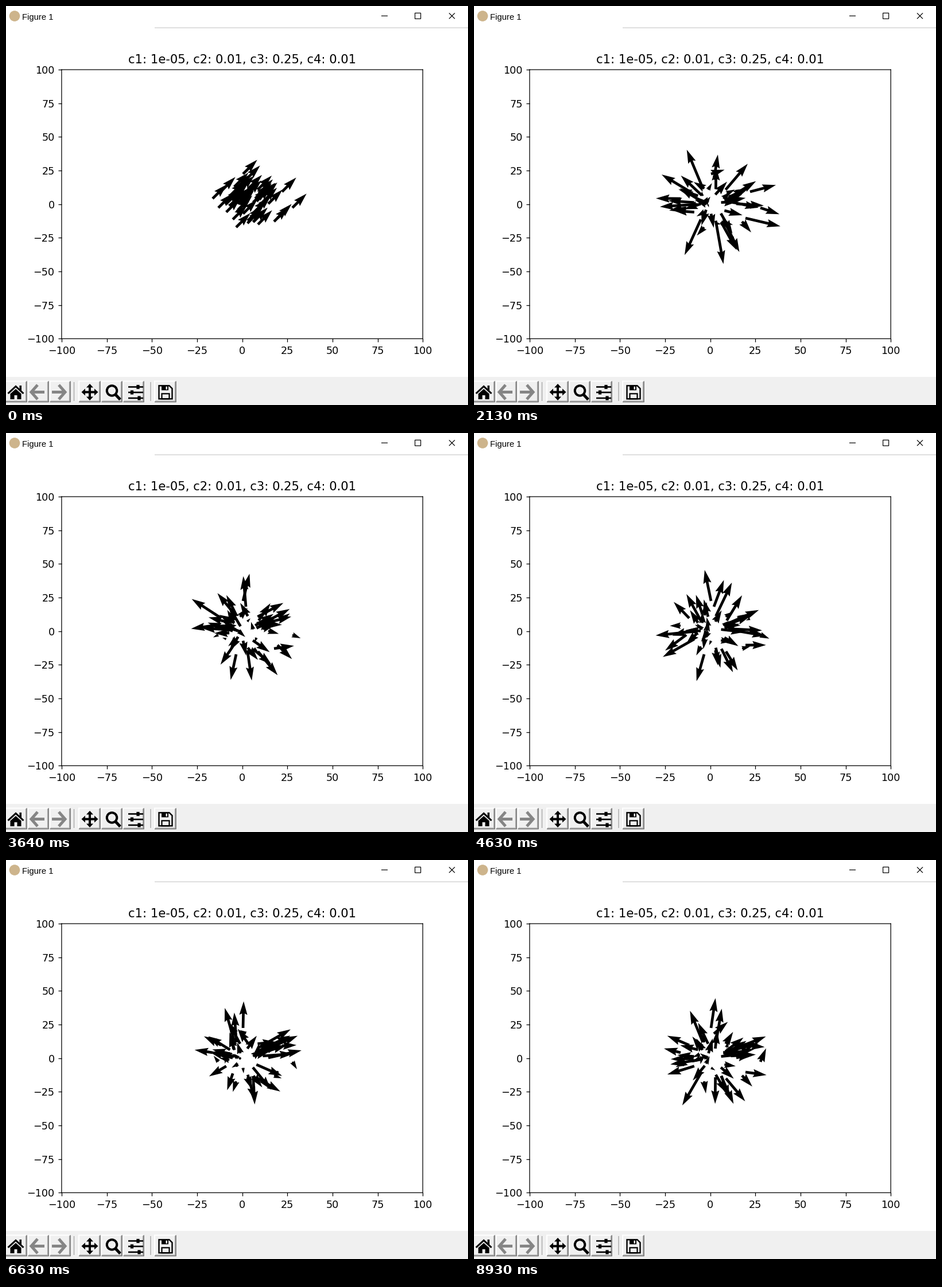
These frames come from a looping animation (805 px wide and 696 px high, 9.01 s). A matplotlib script:

```python
import numpy as np
import matplotlib.pyplot as plt
from matplotlib.animation import FuncAnimation
from matplotlib.patches import Circle, Polygon, Rectangle

W, H = 805, 696
PX = 0.72        # points per pixel at 100 dpi
ZOOM = 1.268     # the window is shown enlarged
FRAMES, STEP = 170, 53

plt.rcParams["font.family"] = "DejaVu Sans"
fig = plt.figure(figsize=(W / 100, H / 100), dpi=100, facecolor="white")

# Plot area
left, right, top, bottom = 96.9, 726.2, 111.1, 580.4
ax = fig.add_axes([left / W, 1 - bottom / H, (right - left) / W, (bottom - top) / H])
ax.set(xlim=(-100, 100), ylim=(-100, 100))
ticks = np.arange(-100, 101, 25)
ax.set_xticks(ticks)
ax.set_yticks(ticks)
ax.tick_params(labelsize=10 * ZOOM, length=3.5 * ZOOM, width=PX * ZOOM, pad=3.5 * ZOOM)
for spine in ax.spines.values():
    spine.set(linewidth=PX * ZOOM, snap=False)
for mark in ax.get_xticklines() + ax.get_yticklines():
    mark.set_snap(False)
ax.set_title("c1: 1e-05, c2: 0.01, c3: 0.25, c4: 0.01", fontsize=12 * ZOOM, pad=6.3 * ZOOM)

# Transparent layer in window pixels, y downwards
win = fig.add_axes([0, 0, 1, 1])
win.set(xlim=(0, W), ylim=(H, 0))
win.axis("off")


def line(points, width=1.0, color="black"):
    xs, ys = zip(*points)
    win.plot(xs, ys, color=color, lw=width * PX, solid_capstyle="butt",
             solid_joinstyle="miter", snap=False)


def box(x0, y0, x1, y1, fill="black", edge="none", width=1.0):
    win.add_patch(Rectangle((x0, y0), x1 - x0, y1 - y0, fc=fill, ec=edge,
                            lw=width * PX, snap=False))


def shape(points, fill="black"):
    win.add_patch(Polygon(points, closed=True, fc=fill, ec="none"))


def button(x0, x1, y0=654.5, y1=690.5):
    box(x0, y0, x1, y1, "#f0f0f0")
    line([(x0, y1), (x0, y0), (x1, y0)], 2, "white")
    line([(x0, y1), (x1, y1), (x1, y0)], 1.6, "#6e6e6e")
    line([(x0 + 1, y1 - 1.5), (x1 - 1.5, y1 - 1.5), (x1 - 1.5, y0 + 1)], 1.2, "#a8a8a8")


def title_bar():
    win.add_patch(Circle((15, 17.5), 9.3, fc="#cdb48c", ec="none"))
    win.text(28, 24, "Figure 1", fontsize=14.8 * PX, family="Liberation Sans", va="baseline")
    y, r = 17.3, 5
    line([(654, y), (665, y)], 1.2)
    box(717.6 - r, y - r, 717.6 + r, y + r, "none", "black", 1.2)
    for slope in (-1, 1):
        line([(777 - r, y - r * slope), (777 + r, y + r * slope)], 1.2)
    line([(259, 38), (W, 38)], 1.4, "#d2d2d2")


def side_arrow(cx, way):
    gray = "#858585"
    tip = cx + 12 * way
    line([(cx, 661), (tip - way, 673.5), (cx, 686)], 5, gray)
    line([(cx - 12 * way, 673.5), (tip - 2 * way, 673.5)], 5, gray)


def home_icon(cx):
    line([(cx - 13.5, 676), (cx, 663.5), (cx + 13.5, 676)], 3)
    box(cx + 6.5, 662, cx + 10, 671)
    shape([(cx - 9.5, 676.5), (cx, 668), (cx + 9.5, 676.5)])
    for side in (-1, 1):
        box(cx + 2.5 * side, 676, cx + 9.5 * side, 686)
    box(cx - 3, 676, cx + 3, 679)


def move_icon(cx, cy):
    line([(cx - 10, cy), (cx + 10, cy)], 4)
    line([(cx, cy - 10), (cx, cy + 10)], 4)
    for dx, dy in [(1, 0), (-1, 0), (0, 1), (0, -1)]:
        bx, by = cx + 8 * dx, cy + 8 * dy
        shape([(cx + 14.5 * dx, cy + 14.5 * dy),
               (bx - 6 * dy, by + 6 * dx), (bx + 6 * dy, by - 6 * dx)])


def zoom_icon(cx, cy):
    win.add_patch(Circle((cx, cy), 8.7, fc="none", ec="black", lw=4 * PX))
    line([(cx + 6, cy + 6.5), (cx + 14.5, cy + 15.5)], 5)


def slider_icon(x0, x1):
    for y, knob in [(664.5, 230), (674, 219.5), (684, 232)]:
        line([(x0, y), (x1, y)], 2.6)
        box(knob - 4, y - 3.6, knob + 4, y + 3.6, "#f0f0f0")
        box(knob - 2.6, y - 3.6, knob + 2.6, y + 3.6)


def save_icon(x0, y0, size=23):
    x1, y1 = x0 + size, y0 + size
    win.add_patch(Polygon([(x0, y0), (x1 - 5, y0), (x1, y0 + 5), (x1, y1), (x0, y1)],
                          fc="none", ec="black", lw=2.4 * PX))
    box(x0 + 4.5, y0, x0 + 16.5, y0 + 8)
    box(x0 + 12, y0 + 1.5, x0 + 14.5, y0 + 6.5, "#f0f0f0")
    box(x0 + 5, y1 - 9, x0 + 18, y1, "none", "black", 2.2)


def toolbar():
    box(0, 647, W, H, "#f0f0f0")
    for x0, count in [(-1, 3), (127, 3), (259, 1)]:
        for k in range(count):
            button(x0 + 38 * k + (k > 0) * 1.5, x0 + 38 * k + 37)
    for x in (118.5, 252):
        line([(x, 656), (x, 689)], 1.4, "#a8a8a8")
    home_icon(17)
    side_arrow(55, -1)
    side_arrow(92, 1)
    move_icon(146, 673.5)
    zoom_icon(184.5, 671)
    slider_icon(213, 239)
    save_icon(266.5, 662.3)


title_bar()
toolbar()

# Fixed arrow tails in window pixels: a dense round core and a few strays
rng = np.random.default_rng(4)
CORE = 40
angle = rng.uniform(0, 2 * np.pi, CORE)
radius = 36 * np.sqrt(rng.uniform(0, 1, CORE))
core = np.column_stack([415 + radius * np.cos(angle), 345 + radius * np.sin(angle)])
strays = [(360, 336), (370, 352), (375, 323), (401, 386), (413, 293), (418, 303),
          (439, 381), (457, 345), (467, 376), (473, 370), (481, 324), (499, 352)]
tails = np.vstack([core, strays])

offset = tails - (412, 346)
dist = np.hypot(*offset.T)[:, None]
push = 1.3 * offset * np.exp(-(dist / 60) ** 2)


def arrow_vectors(step):
    """Screen vectors: all alike at first, then thrown outwards at random."""
    if step == 0:
        return np.full(tails.shape, (24.7, -24.7))
    rng = np.random.default_rng(step)
    vec = push * rng.uniform(0.3, 1.9, dist.shape) + rng.normal(0, 9, tails.shape)
    return np.clip(tails + vec, (280, 236), (540, 460)) - tails


# The pace drifts a little: some steps and the ms at which they begin
pace = {1: 190, 8: 1300, 15: 2410, 23: 3640, 31: 4810, 38: 5910, 46: 7120, 51: 8080, 57: 8930}
times = np.interp(np.arange(1, 58), list(pace), list(pace.values()))

start = arrow_vectors(0)
arrows = win.quiver(*tails.T, start[:, 0], -start[:, 1], angles="uv", units="dots",
                    scale_units="dots", scale=1, width=4.72, color="black")


def update(frame):
    now = (frame + 1) * STEP - 1
    vec = arrow_vectors(int(np.searchsorted(times, now, side="right")))
    arrows.set_UVC(vec[:, 0], -vec[:, 1])
    return [arrows]


anim = FuncAnimation(fig, update, frames=FRAMES, interval=STEP, repeat=True,
                     repeat_delay=0, blit=False)
plt.show()
```
